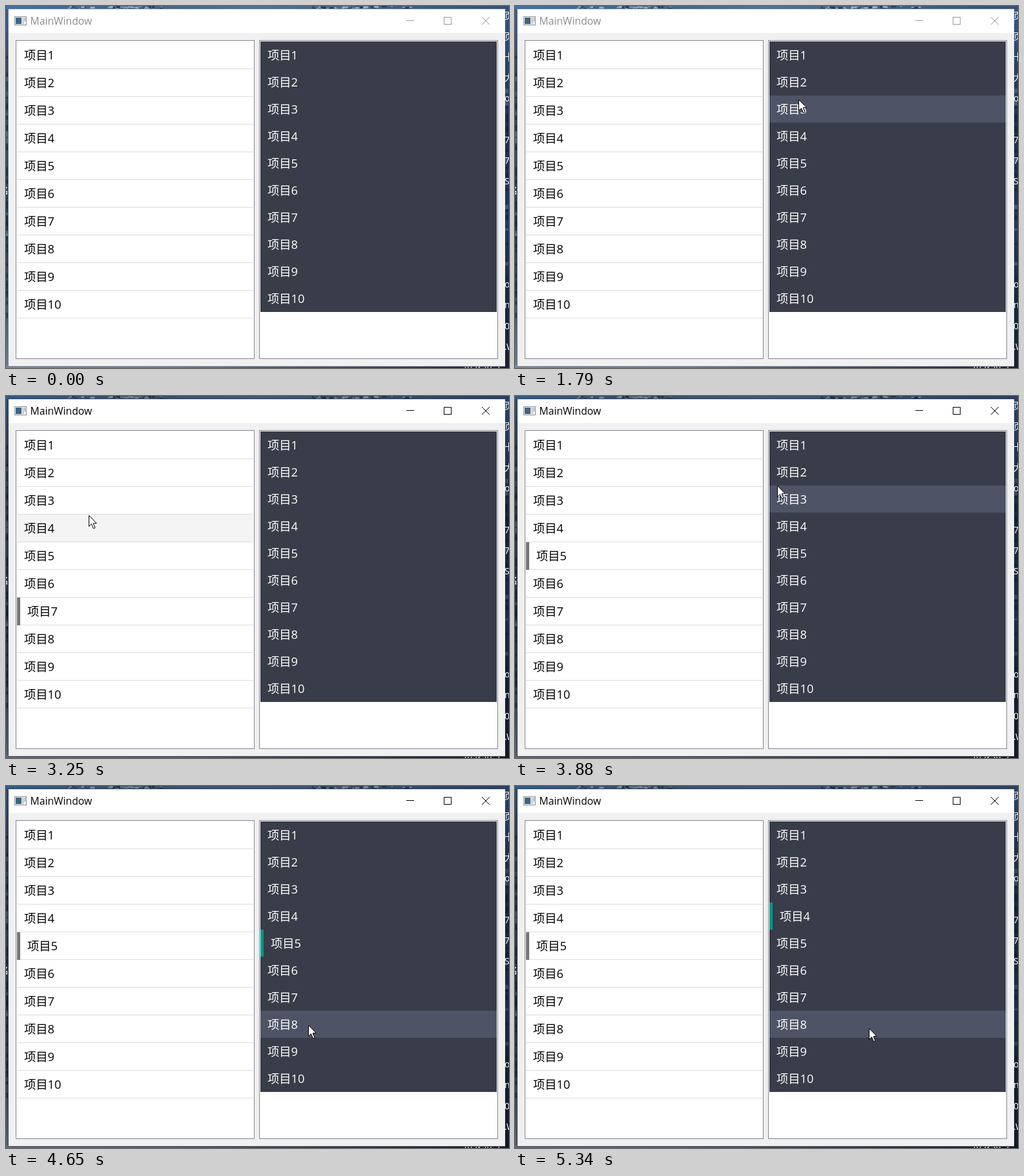
Animation, 779 px wide and 562 px high, one loop 5420 ms. Source, as an HTML page with a canvas:

```html
<!DOCTYPE html>
<html lang="zh-CN">
<head>
<meta charset="utf-8">
<title>MainWindow</title>
<style>
html, body { margin: 0; width: 779px; height: 562px; overflow: hidden; }
canvas { display: block; }
</style>
</head>
<body>
<canvas id="stage" width="779" height="562"></canvas>
<script>
const ctx = document.getElementById('stage').getContext('2d');
const LOOP = 5420, STEPS = 70;
const ACTIVATE = 36;
const ROWS = 10, LIST_TOP = 55, ROW_WIDTH = 366;
const FONT = '"Open Sans", "Noto Sans CJK SC", "Noto Sans CJK", sans-serif';

// Turning points of the pointer: step, x, y
const stops = [
  [1, 370, 439], [5, 214, 262], [9, 214, 262], [12, 160, 99], [17, 125, 353],
  [19, 150, 431], [24, 472, 112], [26, 438, 286], [27, 425, 335], [31, 145, 300],
  [36, 124, 345], [39, 124, 350], [42, 128, 185], [48, 130, 240], [50, 406, 139],
  [52, 445, 100], [57, 438, 240], [60, 468, 371], [65, 505, 200], [69, 548, 376]
];

const lists = [
  { x: 15, rowH: 43, bg: '#ffffff', hover: '#f4f4f4', text: '#000000', bar: '#777777',
    line: '#dcdcdc', clicks: [ACTIVATE, 45, 48] },
  { x: 392, rowH: 42, bg: '#393d49', hover: '#4e5465', text: '#ffffff', bar: '#009688',
    line: null, clicks: [57, 65] }
];

function box(color, x, y, w, h) {
  ctx.fillStyle = color;
  ctx.fillRect(x, y, w, h);
}

function label(text, x, y, size, color) {
  ctx.font = `${size}px ${FONT}`;
  ctx.fillStyle = color;
  ctx.fillText(text, x, y);
}

function gradient(x1, y1, ...colors) {
  const g = ctx.createLinearGradient(0, 0, x1, y1);
  colors.forEach((c, i) => g.addColorStop(i / (colors.length - 1), c));
  return g;
}

function randomizer(seed) {
  return () => (seed = (seed * 16807) % 2147483647) / 2147483647;
}

function drawDesktop(active) {
  const rnd = randomizer(41);
  box(gradient(779, 0, '#447bbd', '#4a6a8c', '#5a7ba0', '#47678f', '#3a5782'), 0, 0, 779, 6);
  box(gradient(0, 562, '#3a6aa5', '#33455f', '#3f5068', '#253853', '#3d5474', '#76879a'), 0, 5, 5, 557);
  box(gradient(0, 562, '#3b5f92', '#2a4365', '#1f3453', '#243f66', '#1a2b44', '#1a2534'), 772, 5, 7, 557);
  box(gradient(779, 0, '#8493a5', '#768698', '#465464', '#182333'), 0, 558, 779, 4);
  for (let i = 0; i < 90; i++) {
    const x = i % 2 ? 92 + rnd() * 150 : 470 + rnd() * 155;
    box(rnd() < 0.5 ? '#26364c' : '#b4bec9', x, rnd() * 4, 2 + rnd() * 5, 1 + rnd() * 2);
  }
  for (let i = 0; i < 60; i++) {
    const tone = rnd() < 0.6 ? 'rgba(20,32,52,.5)' : 'rgba(150,168,190,.35)';
    box(tone, i % 3 ? 0 : 773, 60 + rnd() * 420, 5, 2 + rnd() * 7);
  }
  box(`rgba(0,0,0,${active ? 0.28 : 0.08})`, 0, 0, 779, 562);

  const icons = '页 页 卡 大 ol  7 7 S     ox ne 0 .W'.split(' ');
  icons.forEach((text, i) => label(text, 772, 20 + 32.1 * i, 14, '#ffffff'));
  label('名', -10, 291, 14, '#ffffff');
  label('(v2ray-2', 710, 567, 15, '#e6eaf0');
}

function drawTitleBar(active) {
  const ink = active ? '#000000' : '#999999';
  box(active ? '#3f4b59' : '#76818e', 3, 4, 770, 556);
  box('#f0f0f0', 4, 5, 769, 554);
  box('#ffffff', 4, 5, 769, 37);

  box('#888e94', 13, 16, 19, 14);
  box('#f5f5f5', 14, 17, 17, 12);
  box('#3c6582', 15, 18, 9, 10);
  box('#c9cdd1', 25, 18, 3, 10);
  box('#7b858e', 29, 18, 1, 6);

  label('MainWindow', 37.6, 29, 15.7, active ? '#000000' : '#8c8c8c');
  box(ink, 620, 22, 12, 1);
  ctx.strokeStyle = ink;
  ctx.lineWidth = 1;
  ctx.strokeRect(678.5, 17.5, 11, 11);
  ctx.beginPath();
  ctx.moveTo(737, 17); ctx.lineTo(749, 29);
  ctx.moveTo(749, 17); ctx.lineTo(737, 29);
  ctx.stroke();
}

function rowAt(list, pointer) {
  const dx = pointer ? pointer.x - list.x - 2 : -1;
  return dx >= 0 && dx < ROW_WIDTH ? Math.floor((pointer.y - LIST_TOP) / list.rowH) : -1;
}

function drawList(list, step, pointer) {
  const left = list.x + 2;
  box('#828790', list.x, 53, 370, 495);
  box('#ffffff', list.x + 1, 54, 368, 493);

  // The last click selects the row that was under the pointer then.
  const click = list.clicks.filter(s => s <= step).pop();
  const selected = click ? rowAt(list, pointerAt(click)) : -1;
  const hovered = rowAt(list, pointer);

  for (let i = 0; i < ROWS; i++) {
    const top = LIST_TOP + i * list.rowH;
    const chosen = i === selected;
    box(i === hovered && !chosen ? list.hover : list.bg, left, top, ROW_WIDTH, list.rowH);
    if (list.line) box(list.line, left, top + 42, ROW_WIDTH, 1);
    if (chosen) box(list.bar, left, top, 5, list.rowH);
    label('项目' + (i + 1), left + (chosen ? 16 : 11), top + 28, 18.3, list.text);
  }
}

function drawPointer({ x, y }) {
  ctx.save();
  ctx.translate(x + 0.5, y + 0.5);
  const arrow = new Path2D('M0 0V17L4 13.2L7 20.3L9.6 19.2L6.6 12.3L11.7 12Z');
  ctx.fillStyle = '#ffffff';
  ctx.fill(arrow);
  ctx.strokeStyle = '#000000';
  ctx.lineWidth = 1;
  ctx.stroke(arrow);
  ctx.restore();
}

function pointerAt(step) {
  const next = stops.findIndex(([s]) => s > step);
  if (next === 0) return null;
  const [s1, x1, y1] = stops.at(next);
  const [s0, x0, y0] = next < 0 ? stops.at(-1) : stops[next - 1];
  const k = s1 > s0 ? (step - s0) / (s1 - s0) : 0;
  const ease = k * k * (3 - 2 * k);
  return { x: Math.round(x0 + (x1 - x0) * ease), y: Math.round(y0 + (y1 - y0) * ease) };
}

function render(time) {
  const step = Math.min(STEPS - 1, Math.floor((time + 9) / LOOP * STEPS));
  const active = step >= ACTIVATE;
  const pointer = pointerAt(step);
  drawDesktop(active);
  drawTitleBar(active);
  lists.forEach(list => drawList(list, step, pointer));
  if (pointer) drawPointer(pointer);
}

const start = performance.now();
function tick() {
  render((performance.now() - start) % LOOP);
  requestAnimationFrame(tick);
}
tick();
</script>
</body>
</html>
```
